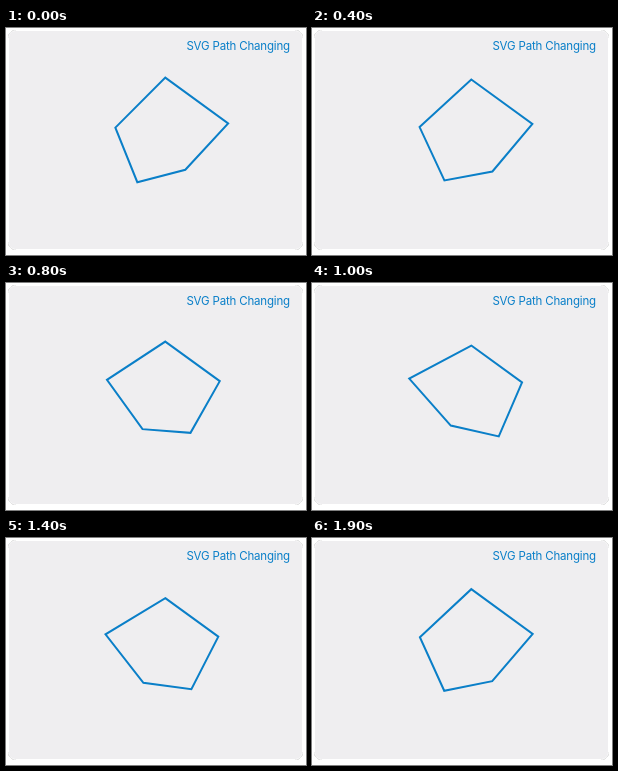
Animation, 300 px wide and 227 px high, one loop 2000 ms. Source, as an HTML page:

```html
<!DOCTYPE html>
<html lang="en">
<head>
<meta charset="utf-8">
<title>SVG Path Changing</title>
<style>
  html, body { margin: 0; width: 100%; height: 100%; overflow: hidden; background: #fff; }
  svg { display: block; width: 300px; height: 227px; }
  .card { fill: #efeef0; stroke: #fff; filter: drop-shadow(0 .7px .6px rgba(0, 0, 0, .5)); }
  text { font: 11.5px Inter, sans-serif; letter-spacing: -.17px; fill: #0a7fc8; text-anchor: end; }
  #shape { fill: none; stroke: #0a7fc8; stroke-width: 2; }
</style>
</head>
<body>
<svg viewBox="0 0 300 227">
  <rect class="card" x="2.5" y="2.5" width="294" height="219" rx="7"/>
  <text x="284" y="22">SVG Path Changing</text>
  <polygon id="shape"/>
</svg>
<script>
  const LOOP = 2000, STEP = 100, PEAK = 1140, REACH = 8.5;
  const CENTER = 159.3;
  const shape = document.getElementById('shape');

  // Swings between -REACH and REACH, slightly eased towards the peak
  function morphAt(time) {
    const away = Math.abs(time - PEAK);
    const s = 1 - 4 * Math.min(away, LOOP - away) / LOOP;
    return REACH * (s - (1 - s * s) / 10);
  }

  // A pentagon symmetric at rest; paired corners drift sideways together and vertically apart
  function pentagon(m) {
    const corner = (side, x, y, dx, dy) => [CENTER + side * x + dx * m, y + side * dy * m];
    const upper = side => corner(side, 56.4, 97.5, -.99, .33);
    const lower = side => corner(side, 24, 148, .61, .95);
    return [[CENTER, 56.5 + 1.06 * m], upper(1), lower(1), lower(-1), upper(-1)];
  }

  function draw(time) {
    const m = morphAt(Math.floor(time % LOOP / STEP) * STEP);
    shape.setAttribute('points', pentagon(m).join(' '));
  }

  const start = performance.now();
  function tick(now) {
    draw(Math.max(0, now - start));
    requestAnimationFrame(tick);
  }
  draw(0);
  requestAnimationFrame(tick);
</script>
</body>
</html>
```
